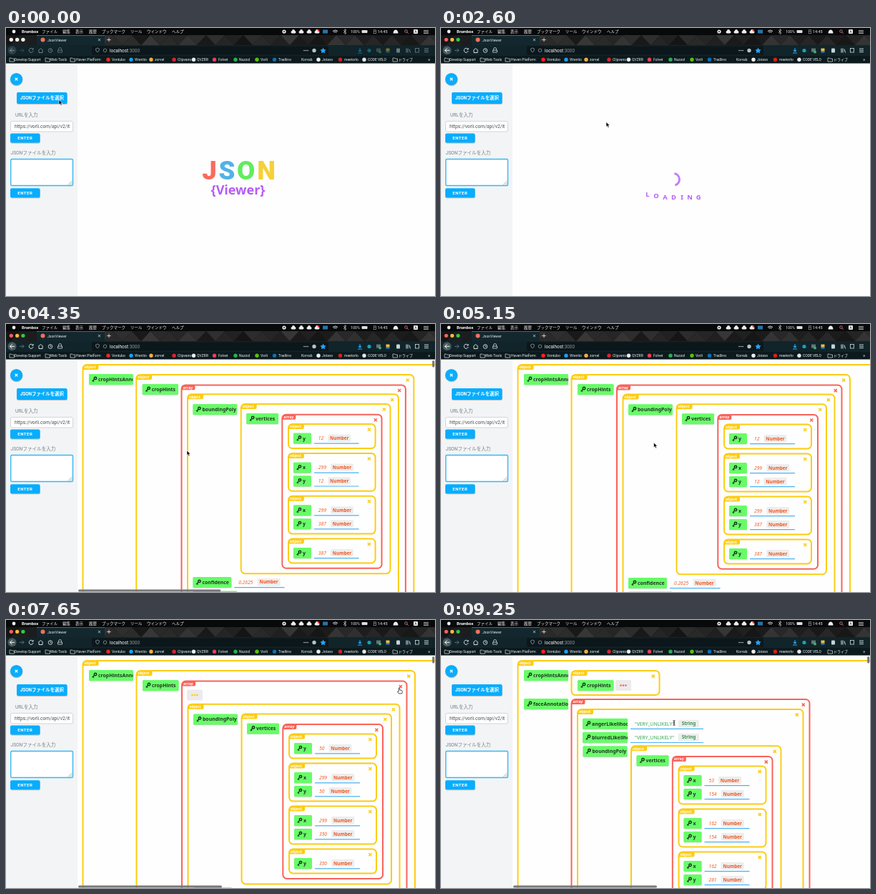
Recreate the animation shown at these times as an HTML page. Size 600x375 px, loop 9.3 s.

```html
<!DOCTYPE html>
<html lang="ja">
<head>
<meta charset="utf-8">
<title>JsonViewer</title>
<style>
  html, body { margin: 0; width: 100%; height: 100%; overflow: hidden; background: #fff; }
  svg { display: block; width: 100vw; height: 100vh; }
  text { font-family: Roboto, "Noto Sans CJK JP", "Noto Sans CJK", sans-serif; white-space: pre; }
  .code text, text.code { font-family: "Noto Sans", "Noto Sans CJK JP", sans-serif; }
</style>
</head>
<body>
<svg id="stage" viewBox="0 0 600 375"></svg>
<script>
const LOOP = 9300;
const FOCUS_AT = 500, LOADING_AT = 1200, TREE_AT = 3650, TREE_DONE = 4500, BARS_OFF = 4850;
const FIRST_FOLD = 6700, SECOND_FOLD = 7850;
const YELLOW = '#fdcc12', RED = '#f9635a', GREEN = '#68fb68', BLUE = '#08adfd', PURPLE = '#b45cf5';
const PAGE = '#fefefe';

const rect = (x, y, w, h, fill, extra = '') =>
  `<rect x="${x}" y="${y}" width="${w}" height="${h}" fill="${fill}" ${extra}/>`;
const circle = (x, y, r, fill, extra = '') =>
  `<circle cx="${x}" cy="${y}" r="${r}" fill="${fill}" ${extra}/>`;
const line = (d, color, width = 1, extra = '') =>
  `<path d="${d}" fill="none" stroke="${color}" stroke-width="${width}" ${extra}/>`;
const text = (x, y, size, fill, s, extra = '') =>
  `<text x="${x}" y="${y}" font-size="${size}" fill="${fill}" ${extra}>${s}</text>`;
const cross = (x, y, r, color, width) =>
  line(`M${x - r} ${y - r}l${2 * r} ${2 * r}m0 ${-2 * r}l${-2 * r} ${2 * r}`, color, width);
const group = (id, content, extra = '') => `<g id="${id}" ${extra}>${content}</g>`;
const BOLD = 'font-weight="700"', MIDDLE = 'text-anchor="middle"';

// ---- browser window ----
function menuBar() {
  const items = [[50, 'ファイル'], [79, '編集'], [97, '表示'], [116, '履歴'], [134, 'ブックマーク'],
    [174, 'ツール'], [197, 'ウインドウ'], [232, 'ヘルプ']];
  let out = rect(0, 0, 600, 10, '#08090b') + circle(11, 5, 2.4, '#eee') +
    text(22, 7.2, 5.8, '#fff', 'Brambox', BOLD) +
    items.map(([x, s]) => text(x, 7.2, 5.5, '#eee', s)).join('') +
    circle(389, 5, 2.6, '#eee') + circle(389, 5, 1, '#222');
  for (const x of [402, 413, 424, 435]) out += rect(x - 3.5, 4, 7, 3.5, '#eee', 'rx="1.7"') + circle(x, 4, 2, '#eee');
  return out + circle(437, 3.5, 1.3, '#e33') + rect(443, 2.5, 7, 5, '#2576a8') +
    line('M457 4.5q3.5 -3 7 0m-5.5 1.5q2 -1.5 4 0', '#eee') +
    line('M472 3l4 4l-2 1.5v-7l2 1.5l-4 4', '#ccc', .7) +
    text(482, 7.2, 5.4, '#eee', '100%') + rect(497.5, 3, 8, 4, '#ddd', 'rx="1"') +
    text(513, 7.2, 5.5, '#eee', '日 14:45') +
    '<path d="M541.5 7.5q.5 -5 3.5 -5t3.500 5z" fill="#eee"/>' +
    circle(559.5, 4.500, 1.8, 'none', 'stroke="#e88" stroke-width=".8"') + line('M561 6l1.800 1.800', '#e88', .8) +
    rect(570, 2, 6, 6, '#eee', 'rx="1"') + text(573, 7, 5, '#111', 'A', MIDDLE) +
    line('M584 3.5h7m-7 2h7m-7 2h7', '#ddd', .8);
}

const lights = colors => colors.map((c, i) => circle(7.3 + i * 8.3, 16.3, 2.6, c)).join('');

function tabBar() {
  let out = rect(0, 10, 600, 14, '#101113');
  for (let i = 0; i < 48; i++) {
    const shade = Math.round(18 + 38 * Math.abs(Math.sin(i * 12.9898) * 43.7 % 1));
    const x = i * 13 - 6, up = i % 2;
    out += `<path d="M${x} ${up ? 24 : 10}h26l-13 ${up ? -14 : 14}z" fill="rgb(${shade},${shade},${shade})"/>`;
  }
  return out + rect(0, 10, 43, 14, '#141719', 'opacity=".75"') + rect(43, 10, 95, 14, '#13282e') +
    rect(43, 10, 95, 1, '#1b7a80') + lights(['#fc605c', '#fdbc40', '#34c84a']) +
    circle(51.5, 16.5, 3, '#f2705f') + text(58, 18.5, 5.1, '#e8eeee', 'JsonViewer') +
    cross(130.5, 16.5, 1.6, '#ddd', .8) + line('M144 13.8v5.4m-2.7 -2.7h5.4', '#ddd', .9);
}

function toolBar() {
  const ink = '#d5dcdd';
  return rect(0, 24, 600, 15, '#11242a') +
    circle(8.5, 31.3, 6, '#4a5b5f') + line('M12 31.3h-6.5m3 -3l-3 3l3 3', '#fff') +
    line('M19 31.3h6m-2.5 -2.5l2.5 2.5l-2.5 2.5', '#68797d', .9) +
    line('M37.6 29.5a3 3 0 1 0 .5 2.5m0 -4v2h-2', ink) +
    line('M45 31.5l3.5 -3l3.5 3m-6 0v3h5v-3', ink) +
    circle(62, 31.5, 2.8, 'none', `stroke="${ink}" stroke-width=".9"`) + line('M62 29.5v2h1.5', ink, .8) +
    line('M73.5 31v-1.5a2 2 0 0 1 4 0v1.5m-5 0h6v3h-6z', ink, .8) +
    rect(120, 25.3, 331, 12.2, '#0c171b', 'rx="1.5"') +
    line('M125.5 29l2.5 -1l2.5 1q0 4 -2.5 5q-2.5 -1 -2.5 -5z', '#9eb0b4', .7) +
    circle(138.5, 31.3, 2.3, 'none', 'stroke="#9eb0b4" stroke-width=".7"') +
    text(145, 33.8, 6.4, '#8c999c', '<tspan fill="#f3f6f6">localhost</tspan>:3000') +
    [417, 419.5, 422].map(x => circle(x, 31.5, .8, ink)).join('') + circle(431, 31.5, 2.7, '#b6c1c4') +
    '<path d="M443.5 27.5l1.3 2.6 2.8 .4-2 2 .5 2.8-2.6-1.3-2.6 1.3 .5-2.8-2-2 2.8-.4z" fill="#27a4f5"/>' +
    line('M495 28v5m-2 -2l2 2l2 -2m-5 4h6', '#2ba7f5', 1.1) +
    circle(508, 31.5, 2.6, '#15a3b8') + rect(518, 28.5, 6, 5, '#65747a') + circle(523, 33.5, 2, '#39b363') +
    rect(531.5, 28.5, 5, 3.5, '#f2bd38') + rect(531.5, 32, 5, 2.5, '#2489e6') +
    rect(546, 28.5, 5, 6, '#c9d2d4', 'rx="1"') +
    line('M560 28.5v6m2 -6v6m2 -5l1.5 5', ink) +
    rect(572.5, 28.5, 5, 5.5, 'none', `stroke="${ink}" stroke-width=".8"`) +
    line('M585 29h6m-6 2.3h6m-6 2.3h6', ink, .9);
}

const unfocused = lights(['#eee', '#eee', '#eee']) +
  rect(0, 24, 120, 15, '#11242a', 'opacity=".5"') + rect(451, 24, 149, 15, '#11242a', 'opacity=".5"');

function bookmarkBar() {
  const folder = x => line(`M${x} 42h2.5l1 1h3v4h-6.5z`, '#d9e0e0', .7);
  const links = [[143, '#f22', 148, 'Vontubo'], [175, '#1d9ff0', 180, 'Wrenlio'], [203, '#f5ad45', 208, 'zorvel'],
    [235, '#dc2430', 240, 'Clipvano'], [262.5, '#eee', 267, 'QVZRR'], [291.5, '#ef4056', 297, 'Folvet'],
    [321, '#2bb24c', 326, 'Nuzzol'], [351, '#55c500', 356, 'Vorli'], [375.5, '#0a72b8', 381, 'Tradlino'],
    [408, '#101820', 413, 'Korvab'], [437, '#eee', 442, 'Jotavo'], [467.5, '#d92020', 473, 'meetorlo'],
    [501, '#e4e8e8', 506, 'CODE VELO']];
  const folders = [[5, 12, 'Develop Support'], [55, 62, 'Web Tools'], [90, 98, 'Haven Platform'], [541, 549, 'ドライブ']];
  const label = (x, s) => text(x, 46.3, 5, '#eef2f2', s);
  return rect(0, 39, 600, 10.5, '#0c1a1e') +
    folders.map(([x, tx, s]) => folder(x) + label(tx, s)).join('') +
    links.map(([x, c, tx, s]) => circle(x, 44.3, 2.7, c) + label(tx, s)).join('') +
    text(590, 46.5, 7, '#ddd', '»');
}

function sidebar() {
  const button = (x, y, w, h, s, size, spacing) =>
    rect(x + .3, y + 1, w, h, '#9ba4aa', 'rx="2" opacity=".7"') + rect(x, y, w, h, BLUE, 'rx="2"') +
    text(x + w / 2, y + h / 2 + 2.3, size, '#fff', s, `${BOLD} ${MIDDLE} letter-spacing="${spacing}"`);
  return rect(0, 49.5, 100, 325.5, '#f2f4f6') +
    circle(14.7, 72.2, 8.8, '#aab2b8') + circle(14.5, 71.5, 8.6, BLUE) + cross(14.5, 71.5, 1.9, '#fff', 1.3) +
    button(15, 90, 70.5, 16, 'JSONファイルを選択', 6.4, 0) +
    text(13, 123.5, 6.6, '#7c8084', 'URLを入力') +
    rect(6.5, 130.5, 87, 14.5, '#fff', 'rx="2" stroke="#d3d6d9"') +
    `<svg x="12" y="130" width="77" height="15">${text(0, 10.2, 6.7, '#4c5054', 'https://vorli.com/api/v2/items')}</svg>` +
    button(6, 147.5, 41.5, 13, 'ENTER', 6, .5) +
    text(6.5, 176.5, 6.6, '#7c8084', 'JSONファイルを入力') +
    rect(6.7, 183.5, 86.8, 37, '#fff', 'rx="1.5" stroke="#38b7f0" stroke-width="1.4"') +
    line('M87 219.5l5.5 -5.5m-2.5 5.5l2.5 -2.5', '#888', .7) +
    button(6, 224.3, 41.5, 13, 'ENTER', 6, .5);
}

// ---- start page ----
const logo = [['J', 284.5, '#f96b5c'], ['S', 309, '#52b2e6'], ['O', 335.5, '#62ec5f'], ['N', 364, '#f5d138']]
  .map(([s, x, c]) => text(x, 212.3, 36.5, c, s, `font-weight="800" ${MIDDLE}`)).join('') +
  text(324.5, 232.5, 18, PURPLE, '{Viewer}', `class="code" ${BOLD} ${MIDDLE}`);

const letterX = [289, 301, 313.5, 325.5, 337, 348, 360];
const arc = 'M1.5 -8.3A8.4 8.4 0 0 1 2.5 8';
const loader = group('spinner', line(arc, PURPLE, 2.8) + line(arc, '#e6ccfc', .6)) +
  [...'LOADING'].map((s, i) =>
    text(letterX[i], 240.3, 9.3, PURPLE, s, `class="code letter" ${BOLD} ${MIDDLE}`)).join('');

// ---- JSON tree ----
function box(type, x, y, right, bottom) {
  const color = type === 'array' ? RED : YELLOW, w = type === 'array' ? 19 : 22;
  return rect(x + 1, y + 1, right - x - 2, bottom - y - 2, PAGE, `rx="5.5" stroke="${color}" stroke-width="2"`) +
    `<path d="M${x + 1} ${y + 8}v-3q0 -4 4 -4h${w - 4}v5q0 2 -2 2z" fill="${color}"/>` +
    text(x + 3, y + 6.2, 5.2, '#fff', type, BOLD) + cross(right - 9.7, y + 8.6, 2, color, 1.5);
}

function key(x, y, w, name) {
  return rect(x, y + .6, w, 15, '#b9d8b9', 'rx="1.5"') + rect(x, y, w, 15, GREEN, 'rx="1.5"') +
    circle(x + 9, y + 6, 1.7, 'none', 'stroke="#1c3520" stroke-width="1.5"') +
    line(`M${x + 7.7} ${y + 7.3}l-3 3m1 -1l1.3 1.3`, '#1c3520', 1.3) +
    `<svg x="${x}" y="${y}" width="${w}" height="15">${text(13, 10, 6.9, '#213525', name, 'font-weight="600"')}</svg>`;
}

function value(x, y, s) {
  const isNumber = typeof s === 'number';
  const width = isNumber ? 3.75 * String(s).replace('.', '').length + (s % 1 ? 1.8 : 0) : 55;
  const start = x + 6, badge = start + width + 6, badgeWidth = isNumber ? 32 : 29;
  const end = Math.max(x + 63, badge + badgeWidth + 6);
  return line(`M${x} ${y + 14.7}H${end}`, '#4bb1f3', 1.2) +
    text(start, y + 9.8, 6.7, isNumber ? '#f25c25' : '#35a552', isNumber ? s : `"${s}"`, isNumber ? 'font-style="italic"' : '') +
    rect(badge, y + 2, badgeWidth, 10.5, '#ededed', 'rx="1.5"') +
    text(badge + badgeWidth / 2, y + 9.6, 6.4, isNumber ? '#ef5520' : '#35914c', isNumber ? 'Number' : 'String', `${BOLD} ${MIDDLE}`);
}

const row = (x, y, w, name, val) => key(x, y, w, name) + value(x + w + 4, y, val);

const folded = (x, y, color) => rect(x, y, 22, 15, '#ebebeb', 'rx="1.5"') +
  [7.5, 11, 14.5].map(dx => circle(x + dx, y + 7.5, 1.3, color)).join('');

function boundingPoly(x, y, points) {
  let out = key(x, y, 62, 'boundingPoly') + box('object', x + 66.5, y - 1, x + 278, y + 239) +
    key(x + 75, y + 13, 45, 'vertices') + box('array', x + 124.3, y + 13.7, x + 266, y + 231.5);
  let top = y + 27.2;
  for (const point of points) {
    const rows = Object.entries(point), bottom = top + 17 + 19 * rows.length;
    out += box('object', x + 133, top, x + 257, bottom);
    rows.forEach(([name, val], i) => out += row(x + 141, top + 13.5 + 19 * i, 25, name, val));
    top = bottom + 5;
  }
  return out;
}

const cropHint = (y, points) => box('object', 253.5, y, 551.5, 460) + boundingPoly(262, y + 14.7, points) +
  row(262, y + 257.5, 54, 'confidence', .2625) + key(262, y + 277, 62, 'importanceFraction');
const corners = (low, high) => [{ y: low }, { x: 299, y: low }, { x: 299, y: high }, { y: high }];

const root = rect(60, 20, 800, 900, PAGE) + box('object', 106.5, 56, 800, 900) + key(116, 70, 62, 'cropHintsAnnotation');
const openHints = root + box('object', 181.5, 70, 573, 500) + key(191, 84, 50.5, 'cropHints') +
  box('array', 245, 84.5, 561.5, 480);
const trees = [
  openHints + cropHint(97.5, corners(12, 387)),
  openHints + folded(253, 97.5, YELLOW) + cropHint(116.7, corners(50, 350)),
  root + box('object', 181.5, 70, 306.5, 106) + key(191, 84, 50.5, 'cropHints') + folded(244, 84, RED) +
    key(116, 110, 62, 'faceAnnotations') + box('array', 181.5, 110, 516.5, 500) + box('object', 190, 124, 507.5, 480) +
    row(198, 137.7, 63, 'angerLikelihood', 'VERY_UNLIKELY') +
    row(198, 156.8, 63, 'blurredLikelihood', 'VERY_UNLIKELY') +
    boundingPoly(198.5, 176.3, [{ x: 53, y: 154 }, { x: 162, y: 154 }, { x: 162, y: 281 }])
];

const outline = 'stroke="#fff" stroke-width=".6" stroke-linejoin="round"';
const cursors =
  group('arrow', `<path d="M0 0v6.8l1.6 -1.4l1.1 2.5l1.3 -.6l-1.1 -2.4h2.2z" fill="#000" ${outline}/>`) +
  group('hand', '<path d="M-.8 0q.8 -1 1.6 0v2.5l3 .8q.8 .4 .5 1.8l-.6 2.4h-4.2l-2 -2.6q.2 -1.2 1.7 -.2z" fill="#fff" stroke="#111" stroke-width=".7"/>') +
  group('beam', line('M-1.5 -3.5q1.5 0 1.5 1v5q0 1 -1.5 1m3 -7q-1.5 0 -1.5 1v5q0 1 1.5 1', '#222', .8));

// The smear thickens the ink vertically, then softens it.
document.getElementById('stage').innerHTML =
  `<defs><filter id="smear" filterUnits="userSpaceOnUse" x="90" y="30" width="680" height="420" color-interpolation-filters="sRGB">
     <feMorphology id="thicken" operator="erode" radius="0 1"/><feGaussianBlur id="blur" stdDeviation="0 2"/></filter>
   <clipPath id="page">${rect(100, 49.5, 500, 325.5, '#000')}</clipPath></defs>` +
  rect(0, 0, 600, 375, PAGE) + group('logo', logo) + group('loader', loader) +
  `<g clip-path="url(#page)" class="code">${group('trees', trees.map((t, i) => group('tree' + i, t)).join(''))}</g>` +
  group('bars', rect(596.2, 51, 3, 9.5, '#777', 'rx="1.5"') +
    rect(101, 371.5, 201, 3, '#777', 'rx="1.5" id="bottomBar"')) +
  sidebar() + menuBar() + tabBar() + toolBar() + bookmarkBar() + group('unfocused', unfocused) + group('cursor', cursors);

// ---- motion ----
const el = id => document.getElementById(id);
const show = (id, on) => el(id).style.display = on ? '' : 'none';
const clamp = v => Math.min(1, Math.max(0, v));
const smooth = v => v * v * (3 - 2 * v);
const letters = document.querySelectorAll('.letter');

// time, x, y of the pointer tip
const pointerPath = [[0, 74, 100.5], [150, 74, 100.5], [1000, 231, 131.5], [2900, 231, 131.5], [4000, 253, 177],
  [4400, 253, 177], [5100, 297.5, 166], [5600, 297.5, 166], [6500, 538, 107.5], [6900, 538, 107.5],
  [7550, 550, 95.5], [8000, 550, 95.5], [9150, 326, 144], [LOOP, 326, 144]];

function pointerAt(t) {
  const i = pointerPath.findIndex(p => p[0] > t);
  const [t0, x0, y0] = pointerPath[i - 1], [t1, x1, y1] = pointerPath[i];
  const k = smooth((t - t0) / (t1 - t0));
  return [x0 + (x1 - x0) * k, y0 + (y1 - y0) * k];
}

function draw(t) {
  show('unfocused', t < FOCUS_AT);
  show('logo', t < LOADING_AT);
  show('loader', t >= LOADING_AT && t < TREE_AT);
  el('spinner').setAttribute('transform', `translate(325 212) rotate(${(t - 2600) * .36})`);
  letters.forEach((letter, i) => {
    const phase = (t + 2400 - 100 * i) % 1600;
    const lift = phase < 1000 ? -4 * Math.sin(phase / 1000 * 2 * Math.PI) : 0;
    letter.setAttribute('transform', `translate(0 ${lift})`);
  });

  const stage = t < FIRST_FOLD ? 0 : t < SECOND_FOLD ? 1 : 2;
  trees.forEach((_, i) => show('tree' + i, t >= TREE_AT && i === stage));
  const rest = (1 - clamp((t - TREE_AT) / (TREE_DONE - TREE_AT))) ** 2;
  const scale = 1 - .115 * rest;
  el('trees').setAttribute('transform', `translate(107 57) scale(${scale}) translate(-107 -57)`);
  if (rest > 0) {
    el('trees').setAttribute('filter', 'url(#smear)');
    el('thicken').setAttribute('radius', `0 ${4 * rest}`);
    el('blur').setAttribute('stdDeviation', `0 ${8.5 * rest}`);
  } else el('trees').removeAttribute('filter');

  show('bars', t >= TREE_AT && t < BARS_OFF || t >= FIRST_FOLD);
  el('bottomBar').setAttribute('width', 201 - 57 * rest);

  const [x, y] = pointerAt(t);
  el('cursor').setAttribute('transform', `translate(${x} ${y})`);
  const hand = t > 7500 && t < 8050, beam = t >= 9000;
  show('hand', hand);
  show('beam', beam);
  show('arrow', !hand && !beam);
}

function tick() {
  draw(performance.now() % LOOP);
  requestAnimationFrame(tick);
}
tick();
</script>
</body>
</html>
```
